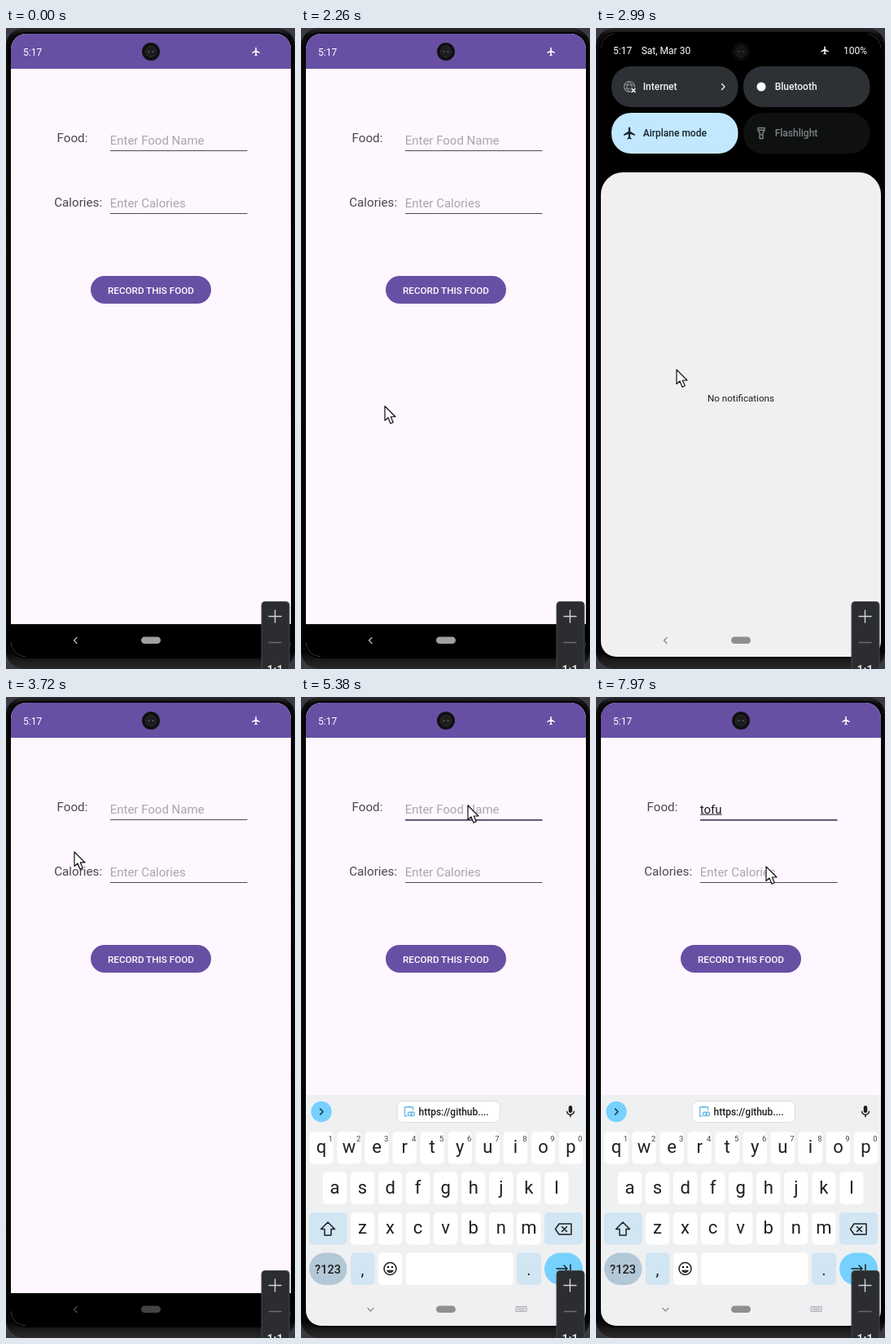
Write an HTML page that moves like this. It is 355x786 px and loops after 8000 ms.

```html
<!DOCTYPE html>
<html lang="en">
<head>
<meta charset="utf-8">
<title>Food recorder</title>
<style>
  html, body { margin: 0; width: 100%; height: 100%; overflow: hidden; background: #000; }
  svg { display: block; width: 355px; height: 786px; font-family: Roboto, sans-serif; }
  text { white-space: pre; }
  .line { fill: none; stroke-linecap: round; stroke-linejoin: round; }
</style>
</head>
<body>
<svg viewBox="0 0 355 786">
  <defs>
    <clipPath id="screen"><rect x="6" y="7" width="344" height="764" rx="19"/></clipPath>
    <linearGradient id="bezel" x2="0" y2="1">
      <stop offset="0" stop-color="#2b2b2d"/><stop offset=".012" stop-color="#0b0b0c"/>
      <stop offset=".975" stop-color="#060606"/><stop offset=".988" stop-color="#1d1d1e"/>
      <stop offset="1" stop-color="#29292a"/>
    </linearGradient>
    <path id="plane" d="M21 16v-2l-8-5V3.500c0-.83-.67-1.500-1.500-1.500S10 2.670 10 3.500V9l-8 5v2l8-2.500V19l-2 1.500V22l3.500-1 3.500 1v-1.500L13 19v-5.500l8 2.500z" transform="translate(-11.5 -12)"/>
  </defs>

  <rect width="355" height="786" fill="#3b3a42"/>
  <rect width="355" height="786" rx="22" fill="url(#bezel)"/>
  <rect x="3" y="5" width="350" height="768" rx="21" fill="#000"/>

  <g clip-path="url(#screen)">
    <g id="app">
      <rect x="6" y="7" width="344" height="764" fill="#fef7ff"/>
      <rect x="6" y="7" width="344" height="43" fill="#6750a4"/>
      <use href="#plane" transform="translate(307 29) scale(.52)" fill="#fff"/>
      <rect x="104" y="304" width="148" height="34" rx="17" fill="#6750a4"/>
      <rect id="line1" x="128" width="168.500"/>
      <rect x="128" y="227" width="168.500" height="1" fill="#4f4b57"/>
      <rect id="compose" x="128" y="143.600" height="1" fill="#1d1b20"/>
      <rect id="caret" x="128" y="127" width="1.200" height="20" fill="#6750a4"/>
      <rect x="6" y="731" width="344" height="40" fill="#000"/>
      <g id="appNav">
        <path class="line" d="M87 747.500l-3.500 3.500 3.500 3.500" stroke="#b9b9bb" stroke-width="1.300"/>
        <rect x="166" y="746.500" width="24" height="8.500" rx="4.250" fill="#a09fa3"/>
      </g>
    </g>

    <g id="kb">
      <rect x="6" y="488" width="344" height="300" fill="#eff0f2"/>
      <circle cx="25" cy="508.500" r="12.700" fill="#76d1ff"/>
      <path class="line" d="M23.500 505l3.500 3.500-3.500 3.500" stroke="#17313f" stroke-width="1.500"/>
      <rect x="118" y="495.500" width="126.500" height="26" rx="7" fill="#fff" stroke="#d9dbde"/>
      <g class="line" stroke="#6cbbe2" stroke-width="1.400">
        <path d="M130 514h-2.500v-11h10v3M130.500 502.500h4"/>
        <rect x="131.500" y="509" width="4.500" height="4.500" rx="2"/>
        <rect x="135" y="509" width="4.500" height="4.500" rx="2"/>
      </g>
      <path transform="translate(322 499.500) scale(.75)" fill="#1f1f1f" d="M12 14c1.660 0 3-1.340 3-3V5c0-1.660-1.340-3-3-3S9 3.340 9 5v6c0 1.660 1.340 3 3 3zM17 11c0 2.760-2.240 5-5 5s-5-2.240-5-5H5c0 3.530 2.610 6.430 6 6.920V21h2v-3.080c3.390-.49 6-3.390 6-6.920z"/>
      <g id="keys"></g>
      <g class="line" stroke="#1f1f1f" stroke-width="1.500">
        <path d="M33 644l-8.500 8.500h4.500v7.500h8v-7.500h4.500z"/>
        <path d="M317 646h15v13h-15l-4.500-6.500zM320.500 649.500l6 6m0-6l-6 6"/>
        <circle cx="109.500" cy="701" r="7.500"/>
        <path d="M106 703.500q3.500 4 7 0z"/>
        <path d="M314 701h13m-4-4l4 4-4 4m8-9v10"/>
      </g>
      <circle cx="107" cy="699" r="1.200"/><circle cx="112" cy="699" r="1.200"/>
    </g>
    <g id="kbNav">
      <path class="line" d="M82 749.500l3.500 3.500 3.500-3.500" stroke="#8d8e91" stroke-width="1.300"/>
      <rect x="166" y="746.500" width="24" height="8.500" rx="4.250" fill="#8f8f92"/>
      <path class="line" d="M264 747.500h13v6h-13zM266 749.500h9m-9 2h9" stroke="#a4a5a8" stroke-dasharray="1.500 .7"/>
    </g>

    <g id="shade">
      <rect x="6" y="7" width="344" height="764" fill="#000"/>
      <use href="#plane" transform="translate(281 27.500) scale(.5)" fill="#fff"/>
      <g id="tiles"></g>
      <rect id="panel" x="6" width="344" rx="27" fill="#f0f0f2"/>
      <path id="sheetBack" class="line" d="M87 747.500l-3.500 3.500 3.500 3.500" stroke-width="1.300"/>
      <rect id="sheetPill" x="166" y="746.500" width="24" height="8.500" rx="4.250"/>
    </g>
  </g>

  <g id="camera">
    <circle cx="178" cy="29" r="11" fill="#101011"/>
    <circle cx="178" cy="29" r="6.500" fill="#1d1d1f" stroke="#2e2e31"/>
    <circle cx="175.500" cy="29" r="1.100" fill="#5b5b60"/><circle cx="180.500" cy="29" r="1.100" fill="#5b5b60"/>
  </g>

  <rect x="314" y="703.500" width="34" height="90" rx="4" fill="#2b2d30" stroke="#47494d"/>
  <path class="line" d="M323 721.500h15m-7.500-7.500v15" stroke="#d3d5d9" stroke-width="1.400"/>
  <path class="line" d="M323 753.500h15" stroke="#6a6c71" stroke-width="1.300"/>
  <g id="zoom"></g>

  <path id="cursor" d="M0 0V17.500L4 14 7 21.200 10.300 19.700 7.300 13H13z" fill="#fff" stroke="#111" stroke-width="1.200" stroke-linejoin="round"/>
</svg>

<script>
const LOOP = 8000, STEP = 66.4;
const $ = id => document.getElementById(id);

function add(parent, tag, attrs) {
  const el = document.createElementNS('http://www.w3.org/2000/svg', tag);
  for (const k in attrs) el.setAttribute(k, attrs[k]);
  return parent.appendChild(el);
}
function label(parent, str, x, y, size, fill, more) {
  const el = add(parent, 'text', { x, y, 'font-size': size, fill, ...more });
  el.textContent = str;
  return el;
}
const set = (el, attrs) => { for (const k in attrs) el.setAttribute(k, attrs[k]); };
const mix = (a, b, p) => a + (b - a) * p;

// Linear track: rows of [time, ...values]
function sample(rows, t) {
  if (t <= rows[0][0]) return rows[0].slice(1);
  for (let i = 1; i < rows.length; i++) {
    const a = rows[i - 1], b = rows[i];
    if (t < b[0]) return a.slice(1).map((v, k) => mix(v, b[k + 1], (t - a[0]) / (b[0] - a[0])));
  }
  return rows[rows.length - 1].slice(1);
}
// Last row whose time has been reached
const stepAt = (rows, t) => rows.filter(r => r[0] <= t).pop();

// App
const app = $('app'), medium = { 'font-weight': 500 }, mid = { 'text-anchor': 'middle' };
label(app, '5:17', 21, 33.500, 12, '#fff');
label(app, 'Food:', 62.500, 140, 15.200, '#49454f');
label(app, 'Calories:', 59.200, 219, 15.200, '#49454f');
const foodText = label(app, '', 127.700, 143, 15, '#aaa5ad');
label(app, 'Enter Calories', 127.700, 220, 15, '#aaa5ad');
label(app, 'RECORD THIS FOOD', 178, 325.700, 11.700, '#fff', { ...medium, ...mid });
label($('zoom'), '1:1', 330.500, 792, 14, '#d3d5d9', { ...mid, 'font-weight': 700 });

// Keyboard
const keys = $('keys'), INK = '#1f1f1f', PALE = '#d1e5f3';
const key = (x, y, w, fill = '#fff', rx = 5) => add(keys, 'rect', { x, y, width: w, height: 39.500, rx, fill });
['qwertyuiop', 'asdfghjkl', 'zxcvbnm'].forEach((row, r) => {
  const y = 533 + r * 49.500;
  [...row].forEach((ch, i) => {
    const cx = [25, 41.500, 75.500][r] + i * 34.050;
    key(cx - 14.700, y, 29.400);
    label(keys, ch, cx, y + 26, 22, INK, mid);
    if (!r) label(keys, (i + 1) % 10, cx + 11.500, y + 11.500, 9.500, '#444', mid);
  });
});
key(10, 632, 46.500, PALE);
key(299, 632, 47, PALE);
key(10, 681.500, 46.500, '#b3c8d6', 19.700);
key(61, 681.500, 29.400, PALE);
key(95, 681.500, 29.400);
key(129, 681.500, 131.500);
key(265, 681.500, 30, PALE);
key(299, 681.500, 47, '#76d1ff', 19.700);
label(keys, '?123', 33, 706.500, 14.500, INK, { ...mid, ...medium });
label(keys, ',', 75.500, 709, 20, INK, mid);
label(keys, '.', 280, 709, 20, INK, mid);
label($('kb'), 'https://github....', 144.500, 512.700, 12, INK, medium);

// Notification shade
const shade = $('shade');
label(shade, '5:17', 21, 31.700, 12, '#fff');
label(shade, 'Sat, Mar 30', 55.700, 31.700, 12, '#fff');
label(shade, '100%', 304, 31.700, 12, '#fff');
const empty = label(shade, 'No notifications', 178, 0, 11.600, '#1d1d1f', mid);

function tile(name, x, row, bg, fg, drawIcon) {
  const g = add($('tiles'), 'g', {});
  const box = add(g, 'rect', { x, width: 155.500, rx: 24, fill: bg });
  const body = add(g, 'g', {});
  label(body, name, x + 38.700, 4.300, 12, fg, medium);
  drawIcon(add(body, 'g', { transform: `translate(${x + 22} 0)` }), body);
  return { box, body, row };
}
const stroke = (g, d, color, w = 1.200) => add(g, 'path', { class: 'line', d, stroke: color, 'stroke-width': w });
const tiles = [
  tile('Internet', 19, 0, '#2d3135', '#f2f3f4', (g, body) => {
    stroke(g, 'M0-6.500a6.500 6.500 0 1 0 .1 0M0-6.500q-6 6.500 0 13m0-13q6 6.500 0 13M-6-2.300H6M-6 2.300H6', '#8b8f93', 1.100);
    add(g, 'rect', { x: 1.500, y: 1, width: 7, height: 7, fill: '#2d3135' });
    stroke(g, 'M3 2.500l4 4m0-4l-4 4', '#fff', 1.500);
    stroke(body, 'M154.500-3.500l3.500 3.500-3.500 3.500', '#f2f3f4', 1.400);
  }),
  tile('Bluetooth', 181, 0, '#2d3135', '#f2f3f4', g => add(g, 'circle', { r: 5.500, fill: '#fff' })),
  tile('Airplane mode', 19, 1, '#c2e8ff', '#17232b', g =>
    add(g, 'use', { href: '#plane', transform: 'scale(.74)', fill: '#17232b' })),
  tile('Flashlight', 181, 1, '#0f1111', '#7f8386', g =>
    stroke(g, 'M-4-6.500h8v3l-2 3v7h-4v-7l-2-3zM-4-3.800h8M0 1v1.500', '#7f8386', 1.400)),
];

const CURSOR = [
  [190, 330, 727], [330, 312, 610], [530, 255, 400], [720, 224, 315],
  [980, 224, 315], [1130, 247, 343], [1400, 165, 190], [1660, 86, 40], [1790, 90, 20],
  [1860, 92, 28], [2060, 99, 270], [2257, 103, 464], [2457, 99, 378], [2660, 99, 384],
  [2988, 99, 419], [3320, 99, 424], [3520, 91, 310], [3718, 84, 190],
  [3960, 88, 165], [4380, 150, 118], [4450, 172, 120], [4650, 205, 133],
  [7440, 205, 133], [7710, 302, 172], [7850, 262, 200], [7965, 209, 208],
];
const SHADE = [[2260, 0], [2330, .5], [2450, 1], [3525, 1], [3650, .4], [3710, 0]];
const SPREAD = [[2457, 0], [2590, .6], [2730, .85], [2930, 1], [3450, 1], [3650, .3]];
const NAV = [[3580, 0], [3718, .42], [3920, 1]];
const TYPED = [[0, ''], [6030, 't'], [6160, 'to'], [6630, 'tof'], [6760, 'tofu']];
const COMPOSED = [[0, 0], [6030, 4.800], [6360, 13.300], [6630, 18.300], [7030, 26.700]];
const CARET = [[0, 0], [4640, 1], [5140, 0], [5700, 1], [7490, 0]];

function draw(now) {
  const t = Math.floor((now + 10) / STEP) * STEP;

  const [x, y] = sample(CURSOR, t);
  set($('cursor'), { transform: `translate(${x} ${y})`, visibility: t < 180 ? 'hidden' : 'visible' });

  // Food field
  const focus = t > 4570, typed = stepAt(TYPED, t)[1];
  set($('line1'), focus ? { y: 150, height: 1.700, fill: '#4a4060' } : { y: 150, height: 1, fill: '#4f4b57' });
  foodText.textContent = typed || 'Enter Food Name';
  foodText.setAttribute('fill', typed ? '#1d1b20' : '#aaa5ad');
  set($('compose'), { width: stepAt(COMPOSED, t)[1] });
  set($('caret'), {
    x: typed ? 127.700 + foodText.getComputedTextLength() : 128,
    opacity: stepAt(CARET, t)[1],
  });

  // Keyboard slides up and slows down
  const up = Math.min(1, Math.max(0, (t - 4800) / 400)), rise = 1 - (1 - up) ** 3;
  set($('kb'), { transform: `translate(0 ${283 * (1 - rise)})` });
  set($('kbNav'), { opacity: rise });
  set($('appNav'), { opacity: t < 3570 ? 1 : sample(NAV, t)[0] });

  // Shade
  const alpha = sample(SHADE, t)[0], p = sample(SPREAD, t)[0];
  set(shade, { opacity: alpha, visibility: alpha ? 'visible' : 'hidden' });
  const h = mix(45.500, 50, p);
  for (const { box, body, row } of tiles) {
    const top = row ? mix(94.500, 104, p) : mix(42, 47, p);
    set(box, { y: top, height: h });
    set(body, { transform: `translate(0 ${top + h / 2})` });
  }
  const top = mix(146.500, 177, p);
  set($('panel'), { y: top, height: 800 - top });
  set(empty, { y: mix(443, 458, p) });
  const grey = (a, b) => `rgb(${Array(3).fill(Math.round(mix(a, b, p)))})`;
  set($('sheetBack'), { stroke: grey(250, 135) });
  set($('sheetPill'), { fill: grey(251, 142) });
  set($('camera'), { opacity: 1 - alpha * .3 });
}

const start = performance.now();
function tick() {
  draw((performance.now() - start) % LOOP);
  requestAnimationFrame(tick);
}
tick();
</script>
</body>
</html>
```
